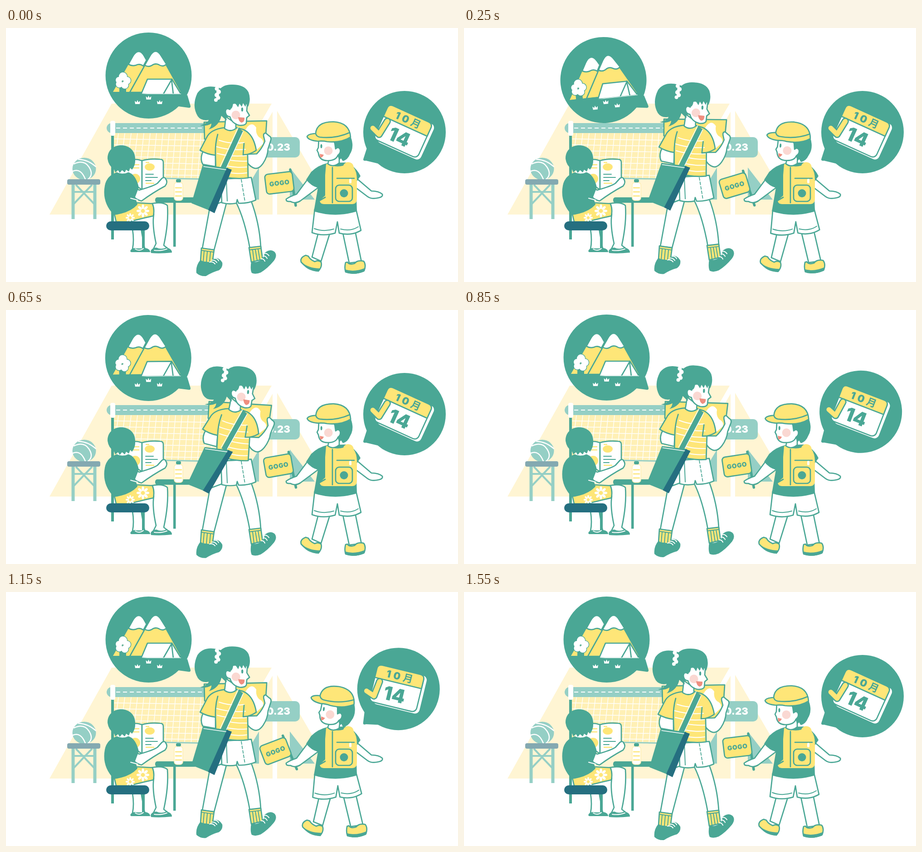
An HTML page for the animation above (1600 ms loop, 997 by 561 pixels).

```html
<!DOCTYPE html>
<html lang="zh">
<head>
<meta charset="utf-8">
<title>Camp day</title>
<style>
html, body { margin: 0; width: 100%; height: 100%; overflow: hidden; background: #fff; }
svg { display: block; width: 100vw; height: 100vh; }
.t { fill: #4aa795; }
.d { fill: #256f80; }
.y { fill: #fee678; }
.p { fill: #fff5d3; }
.l { fill: #95cfc5; }
.w { fill: #fff; }
.b { fill: #fad8d2; }
.m { fill: #ef8f80; }
.o { stroke: #4aa795; stroke-width: 2.7; stroke-linejoin: round; stroke-linecap: round; }
.n { fill: none; }
.s { fill: none; stroke: #fff; stroke-width: 2; stroke-linecap: round; }
.sy { fill: none; stroke: #fee678; stroke-width: 2.4; stroke-linecap: round; }
.sl { fill: none; stroke: #95cfc5; }
text { font-family: Inter, "Noto Sans CJK SC", "Noto Sans CJK JP", sans-serif; font-weight: 900; text-anchor: middle; }
</style>
</head>
<body>
<svg viewBox="0 0 997 561" preserveAspectRatio="none">

<g id="court">
  <path class="p" d="M96 412L233 167H586L444 412ZM588 185V412H457ZM598 183L731 412H598Z"/>
  <path class="l" d="M558 308V379H516ZM626 308V379H681Z"/>
  <rect class="l" x="540" y="241" width="108" height="45" rx="10"/>
  <text class="w" x="596" y="271" font-size="22">10.23</text>
  <path d="M238 232H450V334L238 330Z" fill="#fff0b5"/>
  <path id="mesh" class="s" style="stroke-width:1.4"/>
  <path class="sl" stroke-width="3" d="M236 330L450 334"/>
  <rect class="l" x="222" y="210" width="230" height="22" rx="11"/>
  <path class="s" stroke-dasharray="9 6" style="stroke-linecap:butt" d="M243 221H450"/>
  <rect class="t" x="232" y="234" width="6" height="233"/>
  <rect class="w" x="230" y="205" width="11" height="33" rx="4"/>
</g>

<g id="ball">
  <ellipse class="l" cx="172.500" cy="311" rx="26" ry="24.500"/>
  <path class="s" style="stroke-width:2.5" d="M150 300Q172 290 183 307T181 334M160 290Q181 291 198 306M148 316Q165 309 175 334"/>
  <path class="sl" stroke-width="7" d="M148 344V422M196 344V422"/>
  <path class="sl" stroke-width="4" d="M148 362H196M150 388L190 346M194 388L154 346"/>
  <rect x="135" y="334" width="73" height="12" rx="4" fill="#84a9b1"/>
</g>

<g id="reader">
  <path class="w o" d="M279 444Q283 470 279 488H306L298 444Z"/>
  <rect class="t" x="300" y="445" width="6" height="42"/>
  <path class="t" d="M274 493Q276 486 285 486Q292 491 303 485Q318 487 318 495H276Z"/>
  <path class="s" d="M285 488Q294 494 303 487"/>
  <rect class="t" x="369" y="384" width="5.500" height="99"/>
  <rect class="t" x="329" y="374" width="92" height="12" rx="5"/>
  <path class="w o" d="M316 389Q345 382 356 392Q359 430 348 480L357 487Q340 494 325 488L331 476Q322 435 326 411"/>
  <path class="t" d="M319 493Q322 485 332 485Q342 490 353 485Q366 487 366 496Q340 499 320 497Z"/>
  <path class="s" d="M327 491Q342 493 355 488"/>
  <path class="w o" d="M266 293Q283 287 300 293V357Q283 345 266 344Z"/>
  <path class="w o" d="M300 293Q316 288 340 290Q347 290 347 297V351Q320 350 300 358Z"/>
  <ellipse class="y" cx="317" cy="307" rx="11" ry="8"/>
  <ellipse class="y" cx="285" cy="333" rx="11" ry="11"/>
  <path class="sy" d="M272 302H293M275 309H293M309 343H326M309 297H315"/>
  <path class="o n" style="stroke-width:2" d="M308 323H325M308 330H334M308 337H320"/>
  <path class="y o" d="M239 411L288 386L323 388Q328 400 325 415Q290 423 272 428H243Z"/>
  <g id="flowers"></g>
  <path class="w o" d="M284 354L294 358Q326 349 334 343L344 332Q350 328 352 333Q358 340 351 349Q325 363 299 382Q290 380 283 374Z"/>
  <path class="t" d="M246 318Q222 326 218 348Q211 385 238 413Q272 409 290 390L285 373L293 352Q286 322 268 318Z"/>
  <path class="s" d="M275 376L290 380"/>
  <path class="w" d="M248 310H266L269 319Q258 324 245 319Z"/>
  <path class="t" d="M224 289C223 249 285 249 285 289Q286 303 278 313L274 309 271 317 265 313 262 319 256 314 251 320 247 314 241 319 238 312Q226 304 224 289Z"/>
  <rect class="d" x="221" y="427" width="95" height="20" rx="10"/>
  <rect class="w" x="371" y="341" width="19" height="40" rx="6" stroke="#ffeeb0" stroke-width="1.500"/>
  <rect class="t" x="375" y="334" width="11" height="7" rx="3"/>
  <path class="sy" d="M374 353H387M374 362H387M374 371H387"/>
</g>

<g id="camp">
  <circle class="t" cx="314.500" cy="105" r="95"/>
  <path class="t" d="M400 148L407 172Q408 177 402 176L365 171Z"/>
  <path class="y" d="M236 141L279 65Q293 41 306 65L311 76L274 141Z"/>
  <path class="w o" d="M270 80L280 62Q293 42 305 62L310 71L303 84Q295 78 287 82Q278 85 270 80Z"/>
  <path class="y o" d="M273 142L318 61Q330 42 342 61L387 142Z"/>
  <path class="w o" d="M306 82L318 61Q330 42 342 61L354 80Q346 87 337 81Q329 77 321 83Q313 87 306 82Z"/>
  <path class="t" d="M232 141H395V150H232Z"/>
  <path class="w o" d="M312 113H366L386 146H298Z"/>
  <path class="o n" d="M366 113L347 146M365 113L369 146"/>
  <path class="w" d="M312 145H386V146H298Z"/>
  <path class="t" d="M250 130H265V144H250Z"/>
  <g id="tree"></g>
  <g id="grass" class="w"></g>
</g>

<g id="date">
  <circle class="t" cx="879" cy="230" r="91"/>
  <path class="t" d="M797 262L788 290Q788 294 794 293L840 304Z"/>
  <g transform="translate(878 230) rotate(24.500)">
    <rect class="w" x="-48" y="-42" width="105" height="86" rx="10"/>
    <rect class="w o" x="-56" y="-43" width="106" height="84" rx="10"/>
    <path class="y o" d="M-56 -13V-33Q-56 -43 -46 -43H40Q50 -43 50 -33V-13Z"/>
    <text class="t" x="0" y="-20" font-size="22" letter-spacing="6">10月</text>
    <text class="t" x="-5" y="29" font-size="42">14</text>
  </g>
  <path class="o n" style="stroke-width:16" d="M809 221L823 235L841 206"/>
  <path class="sy" style="stroke-width:10.5;stroke-linejoin:round" d="M809 221L823 235L841 206"/>
</g>

<g id="girl">
  <path class="w o" d="M450 394L433 487L459 490L488 380ZM506 382Q526 420 538 487L562 484Q559 430 540 380Z"/>
  <path class="y o" d="M431 486L459 490L455 519L429 516ZM536 485L562 482L566 511L541 517Z"/>
  <path class="o n" style="stroke-width:2" d="M431 491L458 495M437 493L435 516M444 494L442 517M451 495L449 517M537 490L562 487M544 490L547 515M550 489L554 514M556 488L560 512"/>
  <path class="t" d="M429 512Q418 525 420 541Q428 549 441 548Q455 539 470 535Q479 528 477 518Q470 506 459 508L451 518Q439 520 429 512ZM541 515Q538 533 542 541Q550 545 562 540Q577 531 591 514Q599 503 593 495Q583 486 570 497Q570 506 564 511Q553 520 541 515Z"/>
  <path class="s" d="M449 517Q456 515 461 521M454 513Q461 512 465 518M459 509Q466 508 469 514M563 510Q568 509 571 515M567 504Q573 503 576 509M570 498Q576 497 580 503"/>
  <path class="w o" d="M474 334L541 330L551 380Q533 388 513 387L510 379L508 387Q491 390 476 386Z"/>
  <path class="o n" style="stroke-width:2" d="M486 335L488 382"/>
  <path class="o n" style="stroke-width:1.800" stroke-dasharray="6 4" d="M519 335L527 383"/>
  <g id="torso">
    <path class="y o" d="M437 208L575 205L570 284L520 280L438 245Z"/>
    <path class="w" d="M523 232L532 219Q543 206 552 220Q550 233 558 241Q569 246 567 256L552 270L540 242Z"/>
    <path class="w o" d="M527 279Q530 301 544 308Q556 315 567 299Q577 284 578 267L584 248Q586 241 580 238L573 232Q566 232 569 242L571 250Q565 266 553 278Z"/>
    <path class="w o" d="M435 272Q427 288 434 301L462 306V280Z"/>
    <path class="y o" d="M482 220Q450 224 442 243L428 270Q443 279 462 281L463 315L487 330Q512 334 534 331L533 279Q544 276 552 270Q546 234 523 224L508 220Q493 231 482 220Z"/>
    <path class="s" d="M470 248Q496 257 525 253M464 262Q495 271 528 268M466 277Q495 285 530 282M490 291Q510 295 531 294M489 305Q510 309 531 307M490 319Q510 323 531 320"/>
    <path class="o n" d="M467 235Q461 255 462 281M533 279L523 280L525 255"/>
    <path class="t" d="M473 309L513 221L523 228L484 314Z"/>
    <path class="s" style="stroke-width:1.500" d="M472 307L512 220M486 309L523 229"/>
    <path class="t" d="M466 131Q436 124 422 144Q409 172 423 195Q431 206 447 203Q445 210 428 215Q442 218 453 211Q453 218 447 224Q470 217 475 194L488 206L495 140Z"/>
    <path class="w o" d="M485 196L482 222Q495 231 507 222V211Z"/>
    <path class="w o" d="M494 168V180Q485 175 484 184Q484 195 494 196Q498 211 515 215Q527 216 530 210L531 198L537 193L531 183L533 160Z"/>
    <circle class="b" cx="507" cy="192" r="9.500"/>
    <path class="m" d="M512 197L526 198Q527 208 519 209Q513 206 512 197Z"/>
    <ellipse class="t" cx="521" cy="180" rx="2.200" ry="4.500"/>
    <path class="t" d="M468 140Q477 125 497 125Q526 124 535 142Q541 158 534 174L530 168 528 174 523 166 520 174 515 167 512 175 507 168 501 166Q500 178 495 179Q486 175 484 187L487 204Q470 190 468 165Z"/>
    <g class="w"><circle cx="465" cy="134" r="4.500"/><circle cx="469" cy="141" r="5"/><circle cx="465" cy="148" r="5"/><circle cx="468" cy="154" r="4.500"/><circle cx="463" cy="159" r="4"/></g>
  </g>
  <g id="bag">
    <path class="t" d="M434 302L490 309L459 407L409 387Z"/>
    <path class="d" d="M487 309L498 313L460 409L446 402Z"/>
    <path class="s" style="stroke-width:1.500" d="M436 306L485 313"/>
  </g>
</g>

<g id="kid">
  <g id="sign">
    <path class="o n" style="stroke-width:5.500" d="M627 313L639 392"/>
    <g transform="translate(603 342) rotate(-7)">
      <rect class="y o" x="-30.500" y="-22" width="61" height="44" rx="7"/>
      <text class="t" y="5.500" font-size="14" letter-spacing=".5">GOGO</text>
    </g>
  </g>
  <g id="legs">
    <path class="w o" d="M690 448L675 506L695 515L716 448ZM742 448L757 519L784 516L770 448Z"/>
    <path class="y o" d="M661 502Q648 507 651 517Q665 533 689 537Q698 527 695 517Q688 512 681 516Q670 511 667 504ZM749 518Q746 529 749 538Q769 546 790 536Q795 523 789 515Q775 512 769 520Q757 524 753 517Z"/>
    <path class="t" d="M650 516Q667 531 693 531L689 538Q663 537 650 516ZM747 533Q768 540 792 530L790 538Q767 547 748 540Z"/>
    <path class="w o" d="M681 400L675 452Q699 461 726 453L731 428L735 453Q761 460 783 447L772 400Z"/>
    <path class="o n" style="stroke-width:2" d="M680 443Q701 451 723 444M738 444Q760 450 777 439"/>
  </g>
  <path class="w o" d="M667 332L641 367Q624 373 618 378Q617 384 627 383Q638 389 649 382L692 350ZM772 331L806 360Q822 360 830 367Q832 373 822 375Q806 379 797 372L768 350Z"/>
  <path class="t" d="M710 298Q688 303 673 318L662 335Q673 349 688 353L679 405Q727 420 774 405L772 341L782 327Q772 307 752 297Z"/>
  <path class="y" d="M706 301Q717 294 722 305Q735 307 744 304Q748 294 759 297Q766 299 767 308Q774 318 774 334V377Q774 389 763 389H701Q692 388 692 381L704 370V325Z"/>
  <path class="o n" d="M720 308V386M704 374L692 381M730 332H768"/>
  <rect class="y o" x="727" y="347" width="37" height="36" rx="8"/>
  <circle class="t" cx="745.500" cy="365" r="9"/>
  <rect class="w" x="757" y="333" width="5" height="10" rx="2.500"/>
  <g id="head">
    <path class="w o" d="M713 286L710 300Q722 309 735 298V280Z"/>
    <path class="t" d="M730 245L760 239Q769 262 759 278Q754 291 743 294L739 288 735 292 730 278Z"/>
    <path class="w o" d="M690 243L689 264L686 270L689 276Q691 293 709 293Q728 293 732 281Q739 276 737 268Q733 261 727 267L724 246Z"/>
    <path class="t" d="M718 246H738V265Q732 260 728 266L725 256Z"/>
    <circle class="b" cx="711" cy="271" r="9.500"/>
    <ellipse class="t" cx="695.500" cy="261" rx="2" ry="4.500"/>
    <path class="m" d="M692 278L701 280Q698 287 693 286Z"/>
    <path class="y o" d="M683 233Q685 207 722 207Q758 209 760 241Q740 254 708 251Q700 249 687 250Q667 248 664 240Q666 234 683 233Z"/>
    <path class="o n" d="M683 233Q685 240 692 241Q727 245 758 231"/>
  </g>
</g>
</svg>
<script>
const $ = id => document.getElementById(id);
const LOOP = 1600, STEP = 50;

let mesh = '';
for (let x = 248; x < 490; x += 14) mesh += `M${x} 233L${x - 10 + (x - 340) * .03} 332`;
for (let y = 245; y < 330; y += 13) mesh += `M239 ${y}L450 ${y + 3}`;
$('mesh').setAttribute('d', mesh);

const flower = (x, y, r) => {
  let petals = '';
  for (let a = 0; a < 360; a += 45)
    petals += `<ellipse class="w" cx="${x}" cy="${y - r * .65}" rx="${r * .2}" ry="${r * .36}" transform="rotate(${a} ${x} ${y})"/>`;
  return petals + `<circle class="y" cx="${x}" cy="${y}" r="${r * .22}"/>`;
};
$('flowers').innerHTML = flower(302, 404, 14) + flower(274, 419, 10);

// Outlined circles first, then plain ones on top, to leave one common outline
const leaves = [[258, 107, 9], [249, 115, 7], [267, 116, 8], [250, 124, 7.5], [262, 126, 8]]
  .map(([x, y, r]) => `<circle cx="${x}" cy="${y}" r="${r}"/>`).join('');
$('tree').innerHTML = `<g class="o">${leaves}</g><path class="o" d="M257 132V143"/><g class="w">${leaves}</g>`;

const tuft = (x, y) => `<path d="M${x - 5} ${y + 4}L${x - 6} ${y - 3}L${x - 2} ${y}L${x} ${y - 5}L${x + 2} ${y}L${x + 6} ${y - 3}L${x + 5} ${y + 4}Z"/>`;
$('grass').innerHTML = tuft(290, 164) + tuft(314.5, 154) + tuft(339, 164);

// Smooth rise from a to the peak, then back down at b
const bump = (t, a, peak, b) => {
  if (t <= a || t >= b) return 0;
  const k = t < peak ? (t - a) / (peak - a) : (b - t) / (b - peak);
  return (1 - Math.cos(Math.PI * k)) / 2;
};
const move = (id, value) => $(id).setAttribute('transform', value);
const turn = (id, deg, x, y) => move(id, `rotate(${deg} ${x} ${y})`);

function draw(t) {
  const sway = bump(t, 0, 600, 1200);
  turn('camp', -7.2 * bump(t, 0, 340, 720), 405.5, 176);
  turn('date', -11.8 * bump(t, 720, 1080, 1460), 789, 292);
  turn('sign', -14 * (bump(t, 0, 400, 760) + bump(t, 760, 1160, 1520)), 637, 382);
  turn('head', 5 * bump(t, 0, 350, 700) + 8.5 * bump(t, 800, 1170, 1550), 715, 297);
  turn('legs', -1.6 * (bump(t, 0, 300, 650) + bump(t, 820, 1130, 1480)), 728, 395);
  move('girl', `translate(0 ${-5.7 * (bump(t, 0, 350, 700) + bump(t, 700, 1050, 1400))})`);
  turn('torso', 4.9 * sway, 510, 335);
  move('bag', `translate(0 328) skewX(${-9.5 * sway}) scale(1 ${1 - .04 * sway}) translate(0 -328)`);
}

const start = performance.now();
function tick() {
  const t = (performance.now() - start) % LOOP;
  draw(Math.floor(t / STEP) * STEP);
  requestAnimationFrame(tick);
}
draw(0);
requestAnimationFrame(tick);
</script>
</body>
</html>
```
